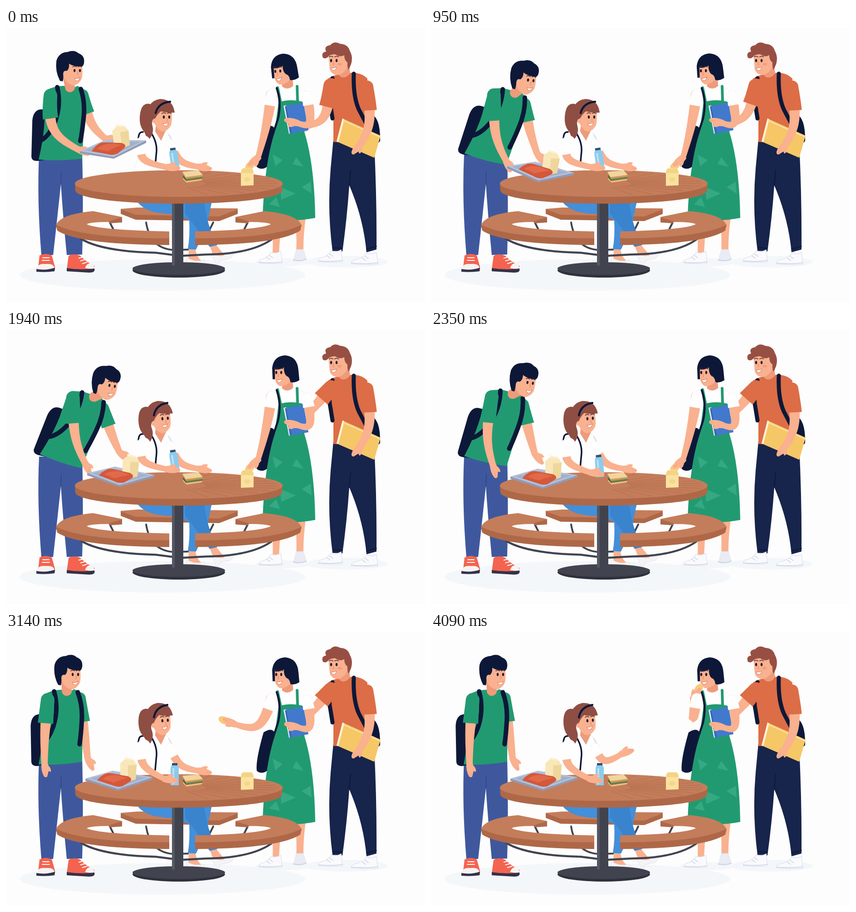
Animation, 924 px wide and 606 px high, one loop 4120 ms. Source, as an HTML page:

```html
<!DOCTYPE html>
<html lang="en">
<head>
<meta charset="utf-8">
<title>Lunch table</title>
<style>
html, body { margin: 0; width: 100%; height: 100%; overflow: hidden; background: #fdfdfd; }
svg { display: block; width: 924px; height: 606px; }
</style>
</head>
<body>
<svg id="stage" viewBox="0 0 924 606" xmlns="http://www.w3.org/2000/svg"></svg>
<script>
const LOOP = 4120;
const SKIN = '#f9b18f', SHADE = '#ee9b7b', GREEN = '#229a71', NAVY = '#0d1838',
  WOOD = '#c47d5b', EDGE = '#ae6848', STEEL = '#41444f', BROWN = '#8f4e43',
  ORANGE = '#dc6d46', WHITE = '#fefefe', PALE = '#e2e6f1';

const p = (d, fill, extra = '') => `<path d="${d}" fill="${fill}" ${extra}/>`;
const line = (d, color, w) => p(d, 'none', `stroke="${color}" stroke-width="${w}" stroke-linecap="round" stroke-linejoin="round"`);
const oval = (x, y, rx, ry, fill) => `<ellipse cx="${x}" cy="${y}" rx="${rx}" ry="${ry}" fill="${fill}"/>`;
const g = (id, body = '') => `<g id="${id}">${body}</g>`;

// Two eyes with brows, a nose and a smile
const face = (x1, x2, y, mx, my, nose) =>
  [x1, x2].map(x => oval(x, y, 2.2, 3.4, '#20182c') + line(`M${x - 4},${y - 8} q4,-3 8,0`, '#4b2a2c', 1.6)).join('') +
  line(`M${(x1 + x2) / 2 + nose},${y + 3} q${nose},6 ${-nose / 2},7`, '#e58c6d', 1.5) +
  p(`M${mx - 6},${my - 1} Q${mx},${my + 1} ${mx + 6},${my - 3} Q${mx + 4},${my + 5} ${mx - 1},${my + 5} Q${mx - 5},${my + 4} ${mx - 6},${my - 1}Z`, WHITE, 'stroke="#d97665" stroke-width="1"');

const floor = oval(345, 546, 315, 35, '#f4f7fa') + oval(750, 517, 92, 13, '#f4f7fa') + oval(610, 518, 60, 9, '#f4f7fa');

const sneaker = (x, y, w) =>
  p(`M${x},${y + 34} L${x + 4},${y + 4} Q${x + 16},${y - 3} ${x + 30},${y + 4} Q${x + w * .72},${y + 18} ${x + w},${y + 26} L${x + w},${y + 36}Z`, '#f4634f') +
  p(`M${x + w * .66},${y + 31} Q${x + w * .72},${y + 20} ${x + w - 8},${y + 20} Q${x + w},${y + 22} ${x + w},${y + 34}Z`, '#f6f3f3') +
  p(`M${x},${y + 31} Q${x + w / 2},${y + 36} ${x + w},${y + 32} Q${x + w + 3},${y + 41} ${x + w - 12},${y + 41} L${x},${y + 38}Z`, '#34314a') +
  line(`M${x + w * .44},${y + 9} l11,-3 M${x + w * .5},${y + 15} l11,-3 M${x + w * .57},${y + 21} l10,-3`, WHITE, 2);

const trainer = (x, y, w, dir) => `<g transform="translate(${x} ${y}) scale(${dir} 1)">` +
  p(`M0,0 Q10,4 21,-2 L24,23 Q${w / 2},27 ${24 - w},24 Q${22 - w},16 ${35 - w},14 Q-8,10 0,0Z`, '#fafafd', `stroke="${PALE}" stroke-width="1.5"`) +
  line(`M24,21 Q0,25 ${24 - w},22 M-4,7 l7,5 M-10,11 l7,5`, '#d5daea', 2) + '</g>';

const boyLegs = p('M73,280 L168,280 Q171,400 168,501 L134,502 Q126,420 121,345 Q112,430 104,502 L78,502 Q68,380 73,280Z', '#3f589d') +
  line('M121,345 L122,318', '#334a89', 2);
const boyShoes = p('M70,538 L74,503 Q88,496 101,503 L108,528 L107,538Z', '#f4634f') +
  p('M68,533 Q70,520 87,522 Q105,520 107,531 L107,536 L68,536Z', '#f6f3f3') +
  p('M67,533 Q88,537 108,530 L107,538 Q88,541 67,539Z', '#34314a') +
  line('M81,508 l14,0 M80,514 l16,0', WHITE, 2) + sneaker(134, 500, 61);

const boyTrunk = p('M76,180 Q60,182 58,205 L56,285 Q57,295 70,294 L100,290 L100,180Z', NAVY) +
  p('M96,134 Q114,127 130,128 Q142,138 157,128 Q172,133 177,145 L172,215 L168,289 Q120,295 72,291 Q84,240 85,200 L84,150Z', GREEN) +
  line('M113,131 Q122,170 108,208 Q96,238 78,248 M165,135 Q175,165 171,200 Q168,230 164,250', NAVY, 10);

const boyHead = oval(128, 103, 5, 7, SKIN) +
  p('M126,80 L167,78 Q170,98 167,112 Q160,126 148,127 Q134,124 126,108Z', SKIN) +
  p('M119,117 Q108,96 111,73 Q116,54 136,53 Q150,47 160,56 Q174,61 172,77 Q171,84 167,85 Q150,86 139,79 Q140,90 134,95 Q127,93 126,101 Q127,112 125,118Z', NAVY) +
  face(151, 163, 94, 157, 112, 1);

const girlHead = p('M318,168 Q300,164 296,188 Q292,212 302,226 Q309,234 311,250 Q325,240 324,222 Q318,200 326,180Z', BROWN) +
  p('M328,182 L365,180 Q367,203 364,215 Q356,229 344,229 Q331,224 327,208Z', SKIN) +
  oval(327, 204, 4.5, 7, SKIN) +
  p('M314,206 Q306,162 340,157 Q368,157 372,187 Q354,188 342,184 Q334,190 329,200 Q322,200 322,211Z', BROWN) +
  line('M330,188 Q336,165 362,163', NAVY, 4.5) + face(348, 360, 197, 352, 212, 1);

const girlLegs = p('M253,400 L290,397 L511,399 L511,411 L470,427 L286,423 L253,410Z', WOOD) +
  p('M253,401 L286,413 L470,417 L511,401 L511,411 L470,427 L286,424 L253,411Z', EDGE) +
  line('M309,430 Q318,488 370,491 L402,490 M457,430 L447,450', STEEL, 4) +
  p('M448,478 L462,478 L484,505 Q490,514 476,512 L456,500Z', SKIN) +
  p('M403,485 L417,485 Q420,508 432,515 L402,518Z', SKIN) +
  p('M290,385 Q312,413 372,411 L404,425 Q406,460 401,489 L419,490 Q436,455 444,430 L454,384Z', '#438fd9') +
  p('M395,386 L437,386 Q444,440 466,480 L449,484 Q424,446 395,410Z', '#3a83cd') +
  p('M398,507 Q415,520 437,513 Q443,521 431,524 L412,521 L402,527 L397,525Z M450,497 Q472,512 499,496 Q504,503 494,510 L472,514 L468,526 L463,520 L455,505Z', '#f6f3f5', `stroke="${PALE}"`);

const girlTrunk = p('M330,218 L352,218 L354,250 L342,256 L328,238Z', SHADE) +
  p('M299,238 Q316,230 328,228 L342,250 L352,228 Q366,238 372,262 L380,318 L280,318 Q296,280 296,250Z', WHITE, 'stroke="#eeeff5"') +
  line('M292,243 Q293,229 302,230 M318,229 Q333,250 332,272 L329,305', NAVY, 3.5) +
  line('M359,236 Q373,258 372,285', '#dde3ee', 3);

const benchSide = end =>
  line('M229,430 L237,446', STEEL, 4) +
  p(`M110,437 Q118,412 192,405 L256,418 L226,429 Q186,429 178,434 Q205,447 ${end},450 L${end},468 Q168,466 110,437Z`, WOOD) +
  p(`M110,435 Q168,465 ${end},465 L${end},480 Q160,479 113,448Z`, EDGE) +
  p('M256,418 L256,430 L228,432 L226,428Z', EDGE);
const benches = line('M165,466 Q210,494 330,497 L385,504 L440,501 Q540,500 585,468', STEEL, 4.5) +
  benchSide(360) + `<g transform="translate(762 0) scale(-1 1)">${benchSide(345)}</g>` +
  oval(381, 536, 102, 16, '#2f323c') + oval(381, 532, 102, 14, STEEL) +
  p('M366,384 L391,384 L391,525 Q378,530 366,525Z', STEEL) + p('M366,384 L372,384 L372,526 L366,525Z', '#555863');

const ray = a => `M${381 + 60 * Math.cos(a)},${344 + 8 * Math.sin(a)} L${381 + 218 * Math.cos(a)},${344 + 27 * Math.sin(a)}`;
const table = p('M152,344 L153,360 C165,398 597,398 609,360 L610,344Z', EDGE) + oval(381, 344, 229, 29.5, WOOD) +
  line([...Array(13)].map((_, i) => ray(-1.25 + i * .21)).join(''), '#b7714f', 1.2);

const sandwich = p('M389,318 L425,315 L434,325 L396,330Z', '#f3d49c') + p('M389,319 L396,330 L434,325 L434,330 L396,335 L390,324Z', '#cf9a5d') +
  line('M391,326 L397,335 L433,330', '#56904e', 2.5) + line('M391,329 L397,338 L432,333', '#5a3c34', 2) +
  p('M390,330 L397,338 L433,333 L432,337 L398,342 L391,335Z', '#e7bd7e');

const snackBag = p('M518,315 L523,310 L542,310 L546,316 L546,348 L518,349Z', '#fae2a0') +
  p('M521,311 L543,311 L546,321 L518,321Z', '#f3d384') + oval(532, 335, 7, 5, '#f6d68c');

const tray = p('M-74,0 L-14,-18 L74,-4 L74,1 L-2,26 L-74,4Z', '#8f9cb8') + p('M-74,-1 L-14,-18 L74,-4 L-2,22Z', '#b6c1d8') +
  p('M-63,-1 L-14,-14 L62,-3 L-2,18Z', '#a3b0cb') +
  p('M3,-35 L14,-44 L33,-41 L39,-31 L37,1 L20,6 L3,1Z', '#f9e7b9') + p('M20,-30 L39,-31 L37,1 L20,6Z', '#efd69c') +
  p('M12,-48 L31,-44 L33,-40 L14,-43Z', '#fdf0cf') +
  p('M-48,3 Q-34,-14 -20,-13 L20,-6 Q32,0 24,6 L8,16 Q-4,19 -14,14Z', '#d4583a') +
  p('M-36,0 Q-20,-12 2,-7 L20,-2 Q2,2 -12,8Z', '#e2694a');

const girl2Legs = p('M583,412 L608,412 Q604,460 602,500 L588,500 Q590,460 583,412Z M637,412 L662,412 Q655,460 656,495 L640,495 Q642,460 637,412Z', SKIN) +
  p('M640,490 L656,490 L662,510 Q650,517 634,514Z', '#e9ecf4', `stroke="${PALE}"`) + line('M634,513 Q650,517 662,511', '#cfd5e5', 2.5) + trainer(585, 496, 51, 1);
const girl2Body = p('M568,222 Q590,208 594,228 L580,304 Q564,317 553,307 Q550,285 568,222Z', NAVY) +
  p('M610,112 L632,112 L634,136 Q620,146 608,134Z', SHADE) +
  p('M594,134 L608,129 Q620,140 634,128 Q652,130 658,140 L664,190 L656,235 L596,235 L588,175 L580,150Z', WHITE, 'stroke="#eef0f5"') +
  p('M601,164 Q628,156 654,163 L658,230 Q680,300 682,420 Q620,432 566,417 Q570,300 592,232Z', GREEN) +
  p('M588,280 l22,12 -16,14Z M605,352 l34,14 -32,14Z M640,285 l16,22 -24,-6Z M652,352 l20,-12 2,26Z M580,390 l16,-16 8,22Z', '#36a982') +
  line('M599,132 L606,166 M642,129 L643,163', GREEN, 6) +
  line('M597,133 Q608,165 600,200 Q590,232 582,252', NAVY, 4.5);
const book = p('M612,172 L618,171 L631,232 L624,234Z', '#f1f3f8') + p('M615,173 L656,165 L667,226 L626,234Z', '#4279cd') + line('M617,174 L629,232', '#3161b0', 2);
const girl2Head = p('M593,80 L626,76 L630,112 Q616,126 604,124 Q594,120 592,102Z', SKIN) +
  p('M588,109 L587,84 Q590,58 615,56 Q643,58 645,90 L647,111 Q636,118 627,115 Q626,104 619,102 Q612,96 613,83 Q602,89 593,87 L593,109Z', NAVY) +
  face(596, 607, 94, 603, 111, -1);

const boy2Legs = p('M722,246 L812,256 Q818,380 817,490 L795,496 Q788,420 757,348 Q752,420 742,494 L720,493 Q708,400 716,310Z', '#17244b') +
  line('M757,348 L760,315', '#0e1838', 2) + line('M721,486 L742,487 M795,489 L817,483', '#0e1838', 2) +
  trainer(718, 493, 53, 1) + trainer(796, 498, 58, 1);
const boy2Body = p('M806,190 Q826,200 825,250 Q818,260 806,250Z', NAVY) + p('M730,88 L757,86 L760,108 Q742,122 730,106Z', SHADE) +
  p('M710,112 Q722,104 733,103 Q745,118 760,99 Q784,98 797,112 L794,180 L797,256 L722,252 L722,190 L708,140Z', ORANGE) +
  line('M720,111 Q709,145 716,175 L720,200 M767,101 Q765,150 778,180 L800,222', NAVY, 9);
const folder = p('M742,200 L826,238 L812,287 L729,251Z', '#f6c766') + p('M742,200 L746,202 L733,252 L729,251Z', '#fdf3da') + line('M745,205 L825,241', '#fbe1a5', 2.5);
const boy2Head = oval(753, 79, 5, 8, SKIN) +
  p('M711,60 L748,54 L754,84 Q746,102 731,104 Q718,103 714,92Z', SKIN) +
  p('M699,66 Q694,54 706,52 Q700,40 715,38 Q724,28 737,35 Q754,36 758,50 Q766,64 761,80 L756,92 Q752,88 753,76 Q746,72 746,60 Q736,66 726,58 Q714,58 710,64 Q706,69 699,66Z', '#984f43') +
  face(717, 729, 72, 723, 89, -1) + oval(736, 80, 5, 3, '#f39c80');

stage.innerHTML = floor + boyLegs + boyShoes + g('boyR') + g('trunk', boyTrunk) + g('neck') + g('boyHead', boyHead) + g('boyL') +
  boy2Legs + boy2Body + g('boy2L') + boy2Head + folder + g('boy2R') +
  girl2Legs + girl2Body + g('girl2Head', girl2Head) + book + g('girl2R') +
  girlLegs + girlTrunk + g('girlHead', girlHead) + benches + table + g('girlR') + sandwich +
  g('bottle', p('M-9,-12 Q-9,-19 -5,-21 L5,-21 Q9,-19 9,-12 L9,24 L-9,24Z', '#8ccbec') + p('M-6,-25 L6,-25 L6,-20 L-6,-20Z', '#33506e') + p('M-5,-14 L-1,-14 L-1,22 L-5,22Z', '#b8e2f5')) +
  g('girlL') + g('tray', tray) + g('girl2L') + snackBag;

// Tapered, bent limb outline; `to` cuts it short for a sleeve
function limb(S, E, H, w0, w1, to = 1) {
  const mix = (a, b, k) => a.map((v, i) => v + (b[i] - v) * k);
  const A = mix(S, E, .85), B = mix(H, E, .85), left = [], right = [];
  for (let i = 0; i <= 16; i++) {
    const k = to * i / 16, u = 1 - k;
    const at = j => u * u * u * S[j] + 3 * u * u * k * A[j] + 3 * u * k * k * B[j] + k * k * k * H[j];
    const dir = j => u * u * (A[j] - S[j]) + 2 * u * k * (B[j] - A[j]) + k * k * (H[j] - B[j]);
    const n = Math.hypot(dir(0), dir(1)) || 1, w = (w0 + (w1 - w0) * i / 16) / 2;
    const ox = -dir(1) / n * w, oy = dir(0) / n * w;
    left.push([at(0) + ox, at(1) + oy]);
    right.unshift([at(0) - ox, at(1) - oy]);
  }
  const xy = q => q.map(v => v.toFixed(1)).join();
  return `M${left.concat(right).map(xy).join('L')}A${w0 / 2},${w0 / 2} 0 0 0 ${xy(left[0])}Z`;
}

function arm(id, { w = 26, wrist = 14, sleeve, sw = 34, cut = .3, thumb = 1, held = '' }) {
  const el = document.getElementById(id);
  el.innerHTML = p('', SKIN) + `<g>${held}${p('M-5,-7 Q8,-11 19,-8 L31,-4 Q35,0 30,4 Q16,11 -5,7Z', SKIN)}` +
    p(`M2,${-6 * thumb} Q10,${-16 * thumb} 20,${-14 * thumb} Q21,${-9 * thumb} 13,${-4 * thumb}Z`, SKIN) +
    line('M20,0 L30,-1', SHADE, 1) + '</g>' + p('', sleeve);
  const [skin, hand, cloth] = el.children;
  return (S, [ex, ey, hx, hy, ang]) => {
    const E = [ex, ey], H = [hx, hy];
    skin.setAttribute('d', limb(S, E, H, w, wrist));
    cloth.setAttribute('d', limb(S, E, H, sw - 4, sw, cut));
    hand.setAttribute('transform', `translate(${hx} ${hy}) rotate(${ang}) scale(.9)`);
  };
}

// Smooth monotone interpolation through rows of [time, ...values]
function tween(rows, t) {
  const last = rows.length - 1;
  if (t <= rows[0][0]) return rows[0].slice(1);
  if (t >= rows[last][0]) return rows[last].slice(1);
  const i = rows.findIndex(r => r[0] > t) - 1;
  const a = rows[i], b = rows[i + 1], h = b[0] - a[0], k = (t - a[0]) / h;
  const slope = (j, c) => (rows[j + 1][c] - rows[j][c]) / (rows[j + 1][0] - rows[j][0]);
  const tangent = (j, c) => {
    if (j === 0) return slope(0, c);
    if (j === last) return 0;
    const m = slope(j - 1, c), n = slope(j, c);
    return m * n <= 0 ? 0 : 2 * m * n / (m + n);
  };
  return a.slice(1).map((v, n) => {
    const c = n + 1, k2 = k * k, k3 = k2 * k;
    return v * (2 * k3 - 3 * k2 + 1) + b[c] * (3 * k2 - 2 * k3) +
      h * (tangent(i, c) * (k3 - 2 * k2 + k) + tangent(i + 1, c) * (k3 - k2));
  });
}

const keys = {
  // trunk angle, head x, head y, head angle
  lean: [[0, 0, 0, 0, 0], [550, 13, 50, 14, 5], [1360, 18.5, 72, 24, 9], [1940, 20, 78, 27, 10],
    [2060, 20, 78, 27, 10], [2800, 1, 18, 5, 3], [3150, -2.5, -4, 0, 0]],
  // elbow x, y, wrist x, y, hand angle
  boyL: [[0, 92, 232, 158, 268, 25], [550, 126, 238, 162, 292, 65], [1360, 144, 240, 168, 292, 70], [1940, 148, 240, 174, 294, 65],
    [2060, 148, 240, 174, 294, 65], [2450, 108, 238, 122, 300, 80], [2800, 89, 232, 87, 292, 85], [3150, 84, 232, 85, 292, 85]],
  boyR: [[0, 184, 215, 218, 244, 20], [550, 206, 225, 228, 278, 60], [1360, 226, 232, 240, 278, 50], [1940, 234, 236, 250, 270, 45],
    [2060, 234, 236, 250, 270, 45], [2800, 180, 230, 184, 282, 65], [3150, 174, 230, 180, 280, 65]],
  tray: [[0, 236, 263, -8], [550, 238, 308, 7], [1360, 246, 319, 7], [1940, 253, 321, 3], [2200, 249, 325, 0]],
  girlTilt: [[1400, 0], [1900, -5]],
  girlL: [[2150, 288, 294, 355, 308, 5], [2700, 290, 296, 350, 325, 10]],
  bottle: [[2150, 371, 290, -8], [2700, 372, 315, 0]],
  girlR: [[3300, 380, 300, 425, 307, 10], [3480, 380, 300, 424, 303, 2], [4000, 378, 296, 420, 270, -18]],
  girl2Tilt: [[600, -4], [1300, 0]],
  girl2L: [[2800, 574, 222, 556, 286, 140], [3080, 562, 224, 502, 222, 190], [3260, 564, 222, 517, 172, 240],
    [3480, 574, 218, 555, 152, 288], [3600, 574, 218, 556, 152, 288], [4050, 575, 216, 578, 148, 305]],
  boy2L: [[600, 707, 206, 672, 214, 170], [1360, 696, 184, 660, 206, 150], [1900, 683, 166, 655, 200, 130]]
};

const draw = {
  boyL: arm('boyL', { sleeve: GREEN, thumb: 1 }),
  boyR: arm('boyR', { sleeve: GREEN, sw: 32 }),
  boy2L: arm('boy2L', { sleeve: ORANGE, sw: 38 }),
  boy2R: arm('boy2R', { sleeve: ORANGE, sw: 32, wrist: 16 }),
  girlL: arm('girlL', { sleeve: WHITE, w: 22, wrist: 12, sw: 34, cut: .33 }),
  girlR: arm('girlR', { sleeve: WHITE, w: 20, wrist: 12, sw: 24, cut: .2 }),
  girl2L: arm('girl2L', { sleeve: WHITE, w: 25, wrist: 12, sw: 27, cut: .14, held: oval(28, -3, 14, 9, '#f7ca7c') }),
  girl2R: arm('girl2R', { sleeve: WHITE, w: 22, wrist: 12, sw: 26, cut: .12 })
};
draw.boy2R([796, 130], [808, 214, 782, 256, 130]);
draw.girl2R([664, 150], [679, 224, 642, 210, 195]);

const set = (id, value) => document.getElementById(id).setAttribute('transform', value);
const place = (id, [x, y, a]) => set(id, `translate(${x} ${y}) rotate(${a})`);

function turn([x, y], deg) {
  const a = deg * Math.PI / 180, c = Math.cos(a), s = Math.sin(a), dx = x - 120, dy = y - 290;
  return [120 + dx * c - dy * s, 290 + dx * s + dy * c];
}

function render(t) {
  const at = name => tween(keys[name], t);
  const [lean, hx, hy, tilt] = at('lean');
  set('trunk', `rotate(${lean} 120 290)`);
  set('boyHead', `translate(${hx} ${hy}) rotate(${tilt} 142 90)`);
  neck.innerHTML = line(`M${turn([141, 131], lean)} L${137 + hx},${111 + hy}`, SHADE, 22);
  draw.boyL(turn([98, 149], lean), at('boyL'));
  draw.boyR(turn([168, 149], lean), at('boyR'));
  place('tray', at('tray'));
  set('girlHead', `rotate(${at('girlTilt')} 338 232)`);
  draw.girlL([304, 252], at('girlL'));
  draw.girlR([362, 256], at('girlR'));
  place('bottle', at('bottle'));
  set('girl2Head', `rotate(${at('girl2Tilt')} 622 125)`);
  draw.girl2L([586, 147], at('girl2L'));
  draw.boy2L([717, 128], at('boy2L'));
}

const start = performance.now();
function tick() {
  render((performance.now() - start) % LOOP);
  requestAnimationFrame(tick);
}
tick();
</script>
</body>
</html>
```
